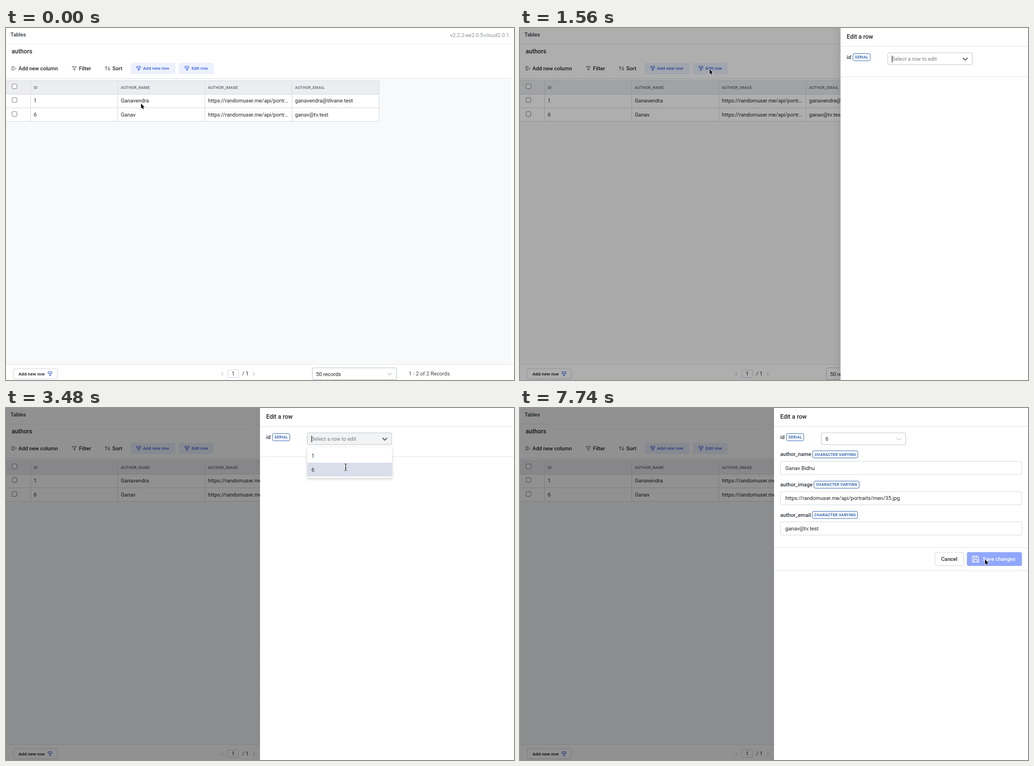
Write an HTML page with a canvas that moves like this. It is 898x624 px and loops after 8000 ms.

```html
<!DOCTYPE html>
<html lang="en">
<head>
<meta charset="utf-8">
<title>Edit a row</title>
<style>
html, body { margin: 0; width: 100%; height: 100%; overflow: hidden; background: #fff; }
canvas { display: block; width: 898px; height: 624px; }
</style>
</head>
<body>
<canvas id="stage"></canvas>
<script>
const W = 898, H = 624, LOOP = 8000;
const canvas = document.getElementById('stage');
const ctx = canvas.getContext('2d');
const dpr = window.devicePixelRatio || 1;
canvas.width = W * dpr;
canvas.height = H * dpr;

const INK = '#1f2328', LINE = '#e6e8eb', BLUE = '#3e63dd', BADGE = '#3568b2';
const BASE = 9.33, SMALL = 8.04, CAPS = 6.7;
const IMAGE = 'https://randomuser.me/api/portraits/men/35.jpg';
const NAME = 'Ganav', EMAIL = 'ganav@tv.test';
const ROWS = [
  ['1', 'Ganavendra', 'ganavendra@tilvane.test'],
  ['6', NAME, EMAIL]
];

const DRAWER_X = 449;
const MENU_OPEN = 2760, PICK = 3510, FOCUS = 4110, BLUR = 7410, SAVE = 7500;
const KEYS = [[4800, ' '], [5130, 'B'], [5340, 'i'], [5400, 'd'], [5700, 'h'], [5850, 'u']];
// Pointer moves: start, end, x, y
const MOVES = [
  [10, 480, 343, 57], [480, 720, 329.5, 70.5], [880, 1110, 335, 73],
  [2110, 2550, 588, 42], [2550, 2820, 600, 61], [2970, 3120, 600.5, 105],
  [6280, 6570, 735, 195.5], [6570, 6750, 735, 237], [6940, 7300, 822, 268.5]
];

const clamp = v => Math.max(0, Math.min(1, v));
const span = (t, a, b) => clamp((t - a) / (b - a));
const smooth = u => u * u * (3 - 2 * u);
const quint = u => u < .5 ? 16 * u ** 5 : 1 - 16 * (1 - u) ** 5;

function text(s, x, y, size = BASE, color = INK, weight = 400, spacing = 0) {
  ctx.font = `${weight} ${size}px Roboto, sans-serif`;
  ctx.letterSpacing = spacing + 'px';
  ctx.fillStyle = color;
  ctx.fillText(s, x, y + size * .35);
  return ctx.measureText(s).width;
}

function fill(x, y, w, h, color) {
  ctx.fillStyle = color;
  ctx.fillRect(x, y, w, h);
}

function box(x, y, w, h, r, bg, border, lw = 1) {
  ctx.beginPath();
  ctx.roundRect(x, y, w, h, r);
  if (bg) { ctx.fillStyle = bg; ctx.fill(); }
  if (border) { ctx.strokeStyle = border; ctx.lineWidth = lw; ctx.stroke(); }
}

function stroke(d, x, y, color, lw = 1) {
  ctx.save();
  ctx.translate(x, y);
  ctx.strokeStyle = color;
  ctx.lineWidth = lw;
  ctx.lineCap = ctx.lineJoin = 'round';
  ctx.stroke(new Path2D(d));
  ctx.restore();
}

const chevron = (x, y, color, lw) => stroke('M-3.6-1.8L0 1.8L3.6-1.8', x, y, color, lw);
const rowIcon = (x, y) => stroke('M.8-3.5H7.2V-.6H.8ZM4-.6V4M2.3 2.3H5.7', x, y, BLUE, .95);

function badge(label, x, y) {
  const pad = 4, w = text(label, x + pad, y, CAPS, BADGE, 600, .27);
  box(x + .5, y - 6.3, w + 2 * pad - 1.3, 12.6, 2.5, null, BADGE, .9);
}

function toolbar() {
  text('Tables', 8, 12, BASE, '#2f3742', 500);
  text('v2.2.2-ee2.0.5-cloud2.0.1', 785, 12.3, BASE, '#868e96');
  fill(0, 28, W, 1, '#eeeff1');
  text('authors', 10, 41.7, 10.7, INK, 500);

  stroke('M0-3H3V3H0ZM5.4-1.6L7 0L5.4 1.6', 11, 71.5, '#50565e', .9);
  text('Add new column', 22, 71.5, BASE, INK, 500);
  stroke('M0-3.2H7L4.4.2V3.4L2.6 2.4V.2Z', 117.3, 71.5, '#50565e', .9);
  text('Filter', 129, 71.5, BASE, INK, 500);
  stroke('M2 3.2V-3.2M0-1.2L2-3.2L4-1.2M7-3.2V3.2M5-.2L7 3.2L9 1.2', 175, 71.5, '#50565e', .9);
  text('Sort', 188, 71.5, BASE, INK, 500);

  box(220.5, 61.8, 79, 20, 3, '#ecf1fd');
  rowIcon(230.7, 71.5);
  text('Add new row', 242, 71.6, SMALL, BLUE, 500);
  box(305.5, 61.8, 62, 20, 3, '#ecf1fd');
  rowIcon(316, 71.5);
  text('Edit row', 328, 71.6, SMALL, BLUE, 500);
}

function table() {
  fill(0, 89, 893, 507, '#f8f9fa');
  fill(0, 89, 893, 1, LINE);
  fill(0, 93, 660, 24, '#ecedf0');
  fill(0, 117, 660, 49, '#fff');
  for (const y of [93, 117, 141, 165]) fill(0, y, 660, 1, '#dadde1');
  for (const x of [43, 197, 351, 505, 659]) fill(x, 93, 1, 73, '#dadde1');

  ['ID', 'AUTHOR_NAME', 'AUTHOR_IMAGE', 'AUTHOR_EMAIL'].forEach((s, i) =>
    text(s, 49 + i * 154, 105.3, CAPS, '#5c636d', 500, .27));
  ROWS.forEach(([id, name, mail], i) => {
    const y = 128.7 + i * 24.8;
    text(id, 49, y);
    text(name, 203, y);
    text(IMAGE.slice(0, 31) + '…', 357, y);
    text(mail, 511, y);
  });
  for (const y of [99.3, 123.4, 148.2]) box(10.8, y, 8.4, 8.4, 1.5, '#fff', '#767b82', .9);
}

function footer() {
  fill(0, 596, W, 1, LINE);
  box(13, 604, 78, 18, 3, '#fff', '#d3d7dc');
  text('Add new row', 22, 613, SMALL, '#11151a', 500);
  rowIcon(74, 613);
  stroke('M1.5-2.5L-1 0L1.5 2.5', 382, 613.5, '#9aa0a6', .9);
  box(392, 606, 19, 13.5, 2, '#fff', '#d3d7dc');
  text('1', 399, 613);
  text('/ 1', 417.5, 613);
  stroke('M-1-2.5L1.5 0L-1 2.5', 438, 613.5, '#9aa0a6', .9);
  box(541.5, 602.5, 149, 21, 2, '#fff', '#c5cad0');
  text('50 records', 548, 613.5);
  chevron(678.5, 613.5, '#a0a5ab', 1);
  text('1 - 2 of 2 Records', 712, 613, BASE, '#3c434b');
}

function select(t) {
  const open = t >= MENU_OPEN && t < PICK;
  box(532.5, 44, 149.3, 21, 2, open ? '#f1f3f4' : '#fff', '#c5cad0');
  if (t < PICK) {
    text('Select a row to edit', 540, 55, BASE, '#777c82');
    if (t < 1920 || t >= 2450) fill(539.7, 49, 1, 12, INK);
  } else {
    text('6', 540, 55);
  }
  if (t < FOCUS) chevron(669.5, 55.2, '#4b5056', 1.5);
  else chevron(669.5, 55.2, '#b0b4b9', 1);
}

function menu(t) {
  ctx.save();
  ctx.shadowColor = 'rgba(0,0,0,.22)';
  ctx.shadowBlur = 4 * dpr;
  ctx.shadowOffsetY = 1.5 * dpr;
  box(532.5, 70, 150, 54, 2, '#fff');
  ctx.restore();
  fill(532.5, t < 3080 ? 72.5 : 97, 150, 24.5, '#d9deea');
  text('1', 540, 85);
  text('6', 540, 109.3);
}

function field(label, y, value, border) {
  const w = text(label, 460, y, BASE, '#2b323b', 500);
  badge('CHARACTER VARYING', 462 + w, y + .2);
  box(460.5, y + 12.5, 426.5, 23.5, 3, '#fff', border);
  return text(value, 469, y + 24.4);
}

function form(t) {
  const focus = span(t, FOCUS, FOCUS + 150) - span(t, BLUR, BLUR + 150);
  const mix = (a, b) => Math.round(a + (b - a) * focus);
  const border = `rgb(${mix(218, 144)},${mix(221, 163)},${mix(224, 180)})`;
  const typed = KEYS.filter(k => t >= k[0]);
  const end = field('author_name', 82, NAME + typed.map(k => k[1]).join(''), border);
  if (t >= FOCUS && t < BLUR) {
    const nameW = ctx.measureText(NAME).width;
    ctx.save();
    ctx.setLineDash([1.3, 1]);
    stroke(`M0 0H${nameW}`, 469, 111, '#e0453a', 1.1);
    ctx.restore();
    const last = typed.length ? typed[typed.length - 1][0] : FOCUS;
    if ((t - last) % 1070 < 535) fill(469.3 + end, 100, 1, 12, INK);
  }
  field('author_image', 135.7, IMAGE, '#dadde0');
  field('author_email', 189.3, EMAIL, '#dadde0');

  fill(449, 247, 449, 1, LINE);
  fill(449, 288, 449, 1, LINE);
  box(733.5, 256, 51, 23.5, 3, '#fff', '#d7dbdf');
  text('Cancel', 744.5, 267.8, BASE, INK, 500);

  ctx.save();
  ctx.globalAlpha = 1 - .38 * span(t, SAVE, SAVE + 120);
  box(790, 255.6, 97.3, 24.3, 3, '#4d72fa');
  ctx.restore();
  stroke('M-5.3-5.3H3L5.3-3V5.3H-5.3ZM-2.8-5.3V-2.3H1.8V-5.3M-3 5.3V.8H3V5.3', 805.3, 267.8, '#fff', 1.1);
  text('Save changes', 818, 267.8, BASE, '#fff', 500);
}

function drawer(t) {
  const p = quint(span(t, 1316, 1753));
  if (!p) return;
  fill(0, 0, W, H, `rgba(0,0,0,${.43 * p})`);
  const x = W - (W - DRAWER_X) * p;
  const shade = ctx.createLinearGradient(x - 15, 0, x, 0);
  shade.addColorStop(0, `rgba(0,0,0,${.02 * (1 - p)})`);
  shade.addColorStop(1, `rgba(0,0,0,${.13 * (1 - p) + .02})`);
  fill(x - 15, 0, 15, H, shade);

  ctx.save();
  ctx.translate(x - DRAWER_X, 0);
  fill(DRAWER_X, 0, W - DRAWER_X, H, '#fff');
  text('Edit a row', 460, 14.8, 10.6, INK, 500);
  fill(449, 32, 449, 1, LINE);
  text('id', 460, 51.3, BASE, '#2b323b', 500);
  badge('SERIAL', 470.5, 51.7);
  select(t);
  if (t < PICK) {
    fill(449, 86, 449, 1, LINE);
    if (t >= MENU_OPEN) menu(t);
  } else {
    form(t);
  }
  ctx.restore();
}

function pointerAt(t) {
  let x = 238.7, y = 134;
  for (const [a, b, tx, ty] of MOVES) {
    const u = smooth(span(t, a, b));
    x += (tx - x) * u;
    y += (ty - y) * u;
  }
  return [x, y];
}

function pointer(t) {
  if (t >= 4800 && t < 6290) return;
  const [x, y] = pointerAt(t);
  const overMenu = t >= MENU_OPEN && t < PICK && y > 72;
  const overField = t >= PICK && x < 887 && [94, 148, 202].some(top => y > top && y < top + 24);
  if (overMenu || overField) {
    const beam = 'M-2-6Q0-6 0-4.6Q0-6 2-6M0-4.6V4.6M-2 6Q0 6 0 4.6Q0 6 2 6M-1 1.6H1';
    stroke(beam, x, y, 'rgba(255,255,255,.8)', 2);
    stroke(beam, x, y, '#111', .9);
    return;
  }
  const arrow = 'M0 0V8.7L2 6.9L3.3 9.9L4.8 9.3L3.5 6.3H6.2Z';
  stroke(arrow, x, y, '#fff', 1.3);
  ctx.save();
  ctx.translate(x, y);
  ctx.fillStyle = '#000';
  ctx.fill(new Path2D(arrow));
  ctx.restore();
}

function draw(t) {
  ctx.setTransform(dpr, 0, 0, dpr, 0, 0);
  fill(0, 0, W, H, '#fff');
  toolbar();
  table();
  footer();
  drawer(t);
  pointer(t);
}

const start = performance.now();
function tick() {
  draw((performance.now() - start) % LOOP);
  requestAnimationFrame(tick);
}
tick();
</script>
</body>
</html>
```
